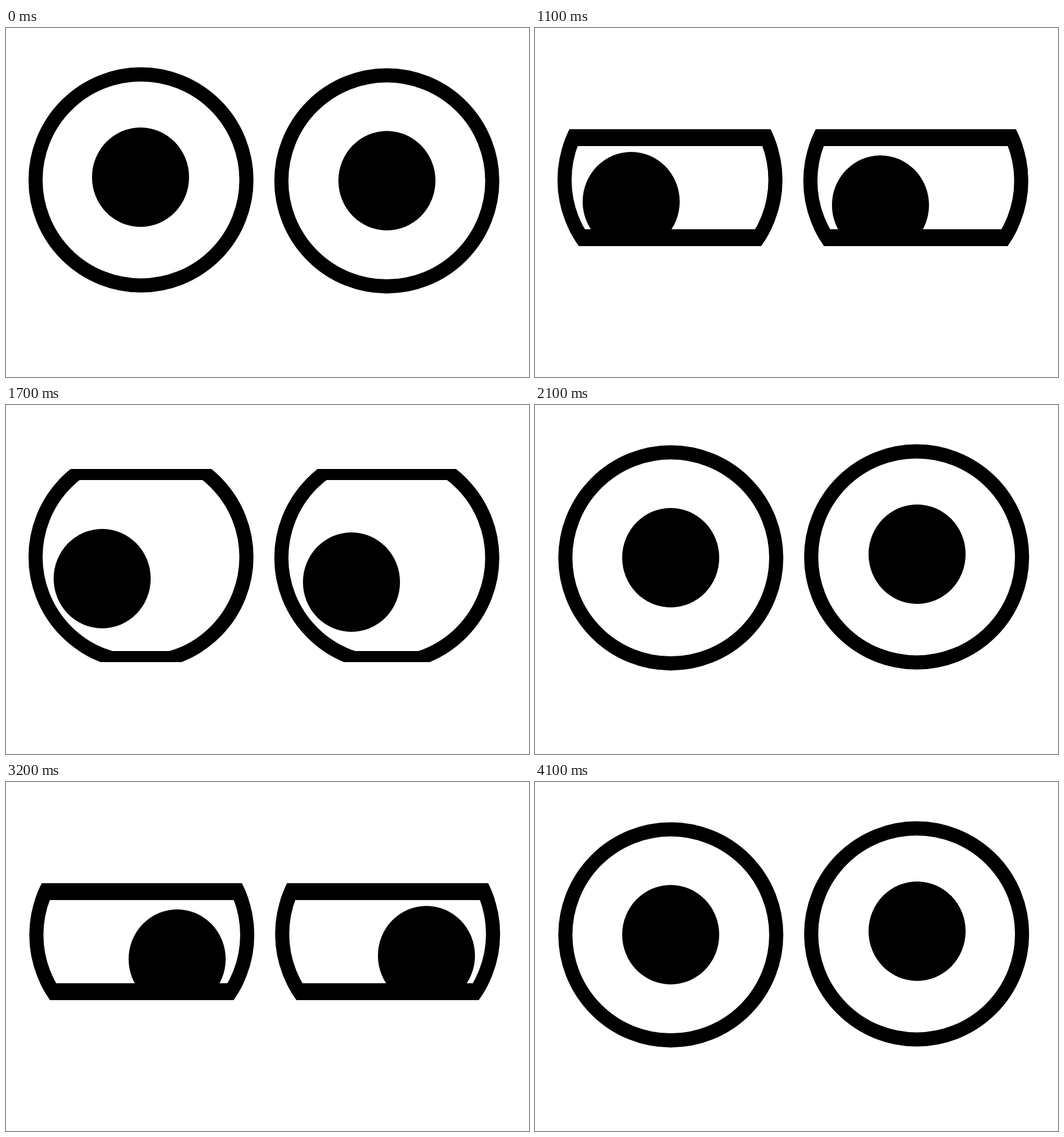
Recreate the animation shown at these times as an HTML page with a canvas. Size 900x600 px, loop 4200 ms.

```html
<!DOCTYPE html>
<html lang="en">
<head>
<meta charset="utf-8">
<title>Blinking eyes</title>
<style>
html, body { margin: 0; width: 100%; height: 100%; overflow: hidden; background: #fff; }
canvas { display: block; }
</style>
</head>
<body>
<canvas id="stage" width="900" height="600"></canvas>
<script>
const ctx = document.getElementById('stage').getContext('2d');
const STEP = 100, HALF_STEPS = 21, MIRROR = 889;
const OUTER = 193.6, RING = 24.3, DROP = 42;

// side: first sideways move; reach: sideways offset once the pupil has dropped
const eyes = [
  { x: 232.3, y: 261.2, px: 231.5, py: 256.5, side: 60, reach: 66 },
  { x: 655.3, y: 262.8, px: 655.5, py: 262.5, side: 61, reach: 61 }
];

// From open to shut
const lids = [
  { top: 0, bottom: 600, thick: 0 },
  { top: 110, bottom: 442, thick: 19 },
  { top: 174, bottom: 375, thick: 29 },
  { top: 243, bottom: 293, thick: 15 },
  { top: 254, bottom: 282, thick: 14 }
];

const clamp = v => Math.max(0, Math.min(1, v));

// Look aside in four steps, down in two, and back to the centre in two
function gaze(eye, step) {
  const aside = clamp((step - 3) / 4);
  const down = clamp((step - 7) / 2);
  const away = clamp((20 - step) / 2);
  const dx = aside * eye.side + down * (eye.reach - eye.side);
  return [-dx * away, DROP * down * away];
}

function disc(x, y, rx, ry) {
  ctx.beginPath();
  ctx.ellipse(x, y, rx, ry, 0, 0, 2 * Math.PI);
}

function drawEye(eye, step) {
  const { top, bottom, thick } = lids[Math.max(0, Math.min(step - 9, 18 - step))];
  const [dx, dy] = gaze(eye, step);
  const mid = OUTER - RING / 2;
  ctx.save();
  ctx.beginPath();
  ctx.rect(0, top, 900, bottom - top);
  ctx.clip();
  disc(eye.x, eye.y, mid, mid);
  ctx.stroke();
  disc(eye.px + dx, eye.py + dy, 83.5, 85.5);
  ctx.fill();
  disc(eye.x, eye.y, OUTER, OUTER);
  ctx.clip();
  ctx.fillRect(0, top, 900, thick);
  ctx.fillRect(0, bottom - thick, 900, thick);
  ctx.restore();
}

function draw(now) {
  const tick = Math.floor(now / STEP) % (2 * HALF_STEPS);
  ctx.setTransform(1, 0, 0, 1, 0, 0);
  ctx.clearRect(0, 0, 900, 600);
  ctx.lineWidth = RING;
  // The second half of the loop is the first half mirrored
  if (tick >= HALF_STEPS) ctx.setTransform(-1, 0, 0, 1, MIRROR, 0);
  eyes.forEach(eye => drawEye(eye, tick % HALF_STEPS));
}

const start = performance.now();
function loop() {
  draw(performance.now() - start);
  requestAnimationFrame(loop);
}
loop();
</script>
</body>
</html>
```
